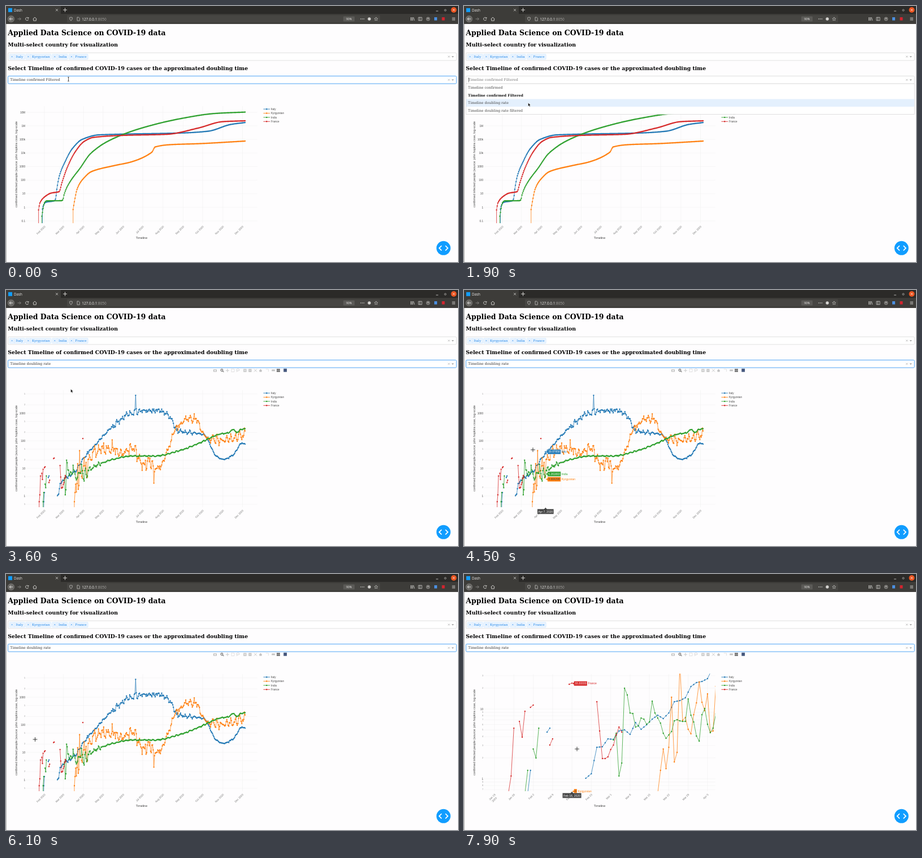
These frames come from a looping animation (800x455 px, 8000 ms). An HTML page:

```html
<!DOCTYPE html>
<html lang="en">
<head>
<meta charset="utf-8">
<title>Dash</title>
<style>
html, body { margin: 0; width: 100%; height: 100%; overflow: hidden; background: #fefdfe; }
svg { display: block; width: 800px; height: 455px; }
text { white-space: pre; }
.serif { font-family: "DejaVu Serif", serif; }
.plot { font-family: "Liberation Sans", Arial, sans-serif; }
.ui { font-family: "Open Sans", sans-serif; }
</style>
</head>
<body>
<svg id="stage" viewBox="0 0 800 455"></svg>
<script>
const LOOP = 8000;
const stage = document.getElementById('stage');

function el(tag, attrs, parent = stage, txt) {
  const e = document.createElementNS('http://www.w3.org/2000/svg', tag);
  for (const k in attrs) e.setAttribute(k, attrs[k]);
  if (txt !== undefined) e.textContent = txt;
  return parent.appendChild(e);
}
const group = (cls = '', parent = stage) => el('g', { class: cls }, parent);
const rect = (p, x, y, width, height, fill, more) => el('rect', { x, y, width, height, fill, ...more }, p);
const circle = (p, cx, cy, r, fill, more) => el('circle', { cx, cy, r, fill, ...more }, p);
const line = (p, d, stroke, w = 0.45, more) => el('path', { d, stroke, 'stroke-width': w, fill: 'none', ...more }, p);
const text = (p, x, y, s, size, fill = '#000', more) => el('text', { x, y, 'font-size': size, fill, ...more }, p, s);
const show = (e, on) => { e.style.display = on ? '' : 'none'; };
const cross = (p, x, y, r, color, w) => line(p, `M${x - r} ${y - r}L${x + r} ${y + r}M${x - r} ${y + r}L${x + r} ${y - r}`, color, w);
const plus = (p, x, y, r, color, w) => line(p, `M${x - r} ${y}H${x + r}M${x} ${y - r}V${y + r}`, color, w);

// ---- browser window ----
function drawBrowser() {
  const g = group('ui'), c = '#d6d5d2';
  rect(g, 0, 0, 800, 14.5, '#2b2a28');
  rect(g, 0, 0, 97, 14.5, '#3d3c39');
  rect(g, 0, 14, 800, 17.8, '#3d3c39');
  rect(g, 0, 31.4, 800, 0.5, '#242321');
  rect(g, 4, 3.8, 7, 7, '#119dff');
  text(g, 14, 9.6, 'Dash', 6.2, '#eeedeb');
  cross(g, 90, 7.2, 2, c, 0.8);
  plus(g, 104.5, 7, 3.5, c, 1);
  line(g, 'M761 9h4', c, 0.8);
  circle(g, 777.5, 7.5, 1.5, 'none', { stroke: c, 'stroke-width': 0.7 });
  circle(g, 792.5, 7, 5, '#e95420');
  cross(g, 792.5, 7, 1.7, '#fff', 0.8);

  circle(g, 9, 23, 5.9, '#6a6966', { stroke: '#8b8a87', 'stroke-width': 0.4 });
  line(g, 'M12 23H6.3m2.4-2.5L6.2 23l2.5 2.5', '#f4f3f1', 0.9);
  line(g, 'M20.5 23h5.7m-2.4-2.5l2.5 2.5-2.5 2.5', '#8b8a87', 0.9);
  line(g, 'M39.6 21.6a2.7 2.7 0 1 0 .2 2.4M39.9 20v2h-2', c, 0.9);
  line(g, 'M47.6 23.2L51 20l3.4 3.2M48.7 22.6v3.6h4.6v-3.6', c, 0.9);

  rect(g, 108, 16.3, 554, 13.2, '#474643', { rx: 1.2 });
  line(g, 'M112.6 20.7l2.4-.8 2.4.8q.2 3.9-2.4 5.5-2.6-1.6-2.4-5.5z', c, 0.7);
  line(g, 'M126 20h2.6l1.6 1.6v4.6H126z', c, 0.7);
  const url = text(g, 134.3, 25.5, '', 6.4, '#f4f3f1');
  el('tspan', {}, url, '127.0.0.1');
  el('tspan', { fill: '#a5a4a1' }, url, ':8050');
  rect(g, 597, 18.4, 20, 9, '#5b5a57', { rx: 1 });
  text(g, 607, 25, '90%', 5.2, '#eeedeb', { 'text-anchor': 'middle' });
  for (const x of [628, 630.7, 633.4]) circle(g, x, 23, 0.8, c);
  circle(g, 643, 23, 2.7, c);
  const star = Array.from({ length: 10 }, (_, i) => {
    const r = i % 2 ? 1.5 : 3.3, a = i * Math.PI / 5;
    return (655 + r * Math.sin(a)) + ' ' + (23.2 - r * Math.cos(a));
  });
  line(g, `M${star.join('L')}z`, c, 0.6);
  line(g, 'M716.5 20v6m1.8-6v6m1.7-6v6m1.3-5.8l1.7 5.8', c, 0.8);
  line(g, 'M730 20.2h6v5.6h-6zm2.6 0v5.6', c, 0.8);
  circle(g, 747, 23, 2.9, 'none', { stroke: c, 'stroke-width': 0.7 });
  circle(g, 747, 22.6, 1.2, c);
  rect(g, 758, 20, 5, 5.6, '#4b8fe0');
  rect(g, 771.5, 20, 5, 5.6, '#d3242e');
  line(g, 'M789.5 21h5.5m-5.5 2h5.5m-5.5 2h5.5', c, 0.8);
  rect(stage, 0, 31.8, 0.6, 424, '#8a8988');
}

// ---- page header and dropdowns ----
const options = ['Timeline confirmed', 'Timeline confirmed Filtered', 'Timeline doubling rate', 'Timeline doubling rate filtered'];
const countries = [
  { name: 'Italy', color: '#1f77b4', tagX: 6, tagW: 27.3 },
  { name: 'Kyrgyzstan', color: '#ff7f0e', tagX: 34.8, tagW: 45 },
  { name: 'India', color: '#2ca02c', tagX: 81.7, tagW: 27.5 },
  { name: 'France', color: '#d62728', tagX: 111.3, tagW: 33.8 }
];

function dropdown(p, y) {
  const box = rect(p, 3.5, y, 793.7, 13.6, '#fff', { rx: 1.7, stroke: '#ccc', 'stroke-width': 0.6 });
  cross(p, 783.8, y + 6.8, 1.5, '#999', 0.6);
  el('path', { d: `M788.6 ${y + 6.1}h4.2l-2.1 2.2z`, fill: '#999' }, p);
  return box;
}

function drawHeader() {
  const g = group('serif'), bold = { 'font-weight': 'bold' };
  text(g, 3.3, 51.8, 'Applied Data Science on COVID-19 data', 12.47, '#000', bold);
  text(g, 3.3, 72.4, 'Multi-select country for visualization', 9.35, '#000', bold);
  text(g, 3.3, 114, 'Select Timeline of confirmed COVID-19 cases or the approximated doubling time', 9.35, '#000', bold);
  dropdown(g, 83.2);
  for (const { name, tagX: x, tagW } of countries) {
    rect(g, x, 85.6, tagW, 9.3, '#ebf5ff', { rx: 0.9, stroke: '#c2e0ff', 'stroke-width': 0.45 });
    line(g, `M${x + 8.8} 85.6v9.3`, '#c2e0ff');
    cross(g, x + 4.6, 90.1, 1.4, '#3390ee', 0.55);
    text(g, x + 11.3, 92.3, name, 5.61, '#1a82e8');
  }
}

// ---- data: day 0 is Jan 19, 2020 ----
const X = d => 53 + 1.153 * d;
const LAST = 321;

// cumulative cases: x, y knots of each log curve
const totals = [
  [64.3, 362, 66, 355, 70, 349, 86, 346, 88, 342, 90, 325, 95, 300, 104, 278, 117, 254, 135, 237, 165, 229,
    315, 225.5, 358, 222.5, 398, 210.5, 424, 207],
  [118.5, 363, 121, 348, 126, 325, 135, 309, 152, 294, 190, 284, 222, 277, 258, 260, 264, 250.5, 290, 246.5,
    345, 244.5, 424, 240],
  [63.3, 374, 68, 350, 72, 346.3, 98, 346, 101, 344, 102, 338, 110, 318, 132, 287, 150, 262, 184, 238.5,
    240, 217, 310, 200, 370, 191, 424, 188.5],
  [57.5, 363, 60, 350, 68, 339.5, 80, 332.5, 94, 330, 99, 314, 108, 288, 122, 260, 138, 241, 155, 233.5,
    205, 230, 285, 228, 340, 217, 384, 205.5, 424, 204]
];

// doubling time up to April: runs of [first day, step, heights...] where 364 is 1 and 240 is 10
const early = [
  [[13, 1, 349], [19, 1, 281, 274],
    [33, 2, 363, 355, 308, 307, 293, 294, 279, 277, 285, 264, 276, 268, 258, 251, 257, 247, 227, 225, 220, 200, 193, 191, 186, 165]],
  [[60, 1, 349, 311, 346, 308, 219, 334, 317, 160, 260, 255, 276, 284, 250, 229, 192, 228, 243, 213, 281, 279]],
  [[12, 1, 349], [14, 1, 311, 327, 274],
    [43, 1, 295, 283, 359, 336, 203, 215, 247, 248, 272, 270, 256, 258, 267, 263, 226, 247, 256, 265, 283, 292, 286, 280,
      261, 259, 261, 262, 262, 222, 251, 263, 288, 297, 250, 239, 267, 282, 274]],
  [[6, 1, 359, 274], [9, 1, 262, 290, 244], [13, 1, 237, 233], [20, 1, 304, 293], [27, 1, 196, 194],
    [37, 1, 227, 279, 328, 328, 325, 312, 304, 286, 272, 281], [72, 1, 106]]
];

// doubling time from April on: x, y knots, with a weekly swing and noise added
const late = [
  [145, 290, 168, 264, 185, 246, 205, 229, 217, 219, 228.3, 218, 229.4, 188, 231, 216, 250, 214, 268, 214, 290, 225,
    304, 250, 350, 257, 372, 295, 384, 301, 402, 293, 418, 272, 424, 274],
  [145, 305, 160, 285, 190, 280, 205, 293, 226, 282, 240, 310, 260, 304, 261.7, 344, 263.3, 318, 270, 316, 286, 284,
    304, 242, 321, 229, 336, 228, 344, 248, 364, 267, 390, 266, 406, 261, 424, 254],
  [145, 321, 157, 313, 190, 301, 225, 295, 265, 295, 305, 286, 345, 271, 375, 257, 395, 253, 402, 247, 408, 253, 418, 247, 424, 247]
];
const swing = [
  x => x < 185 ? 2.2 : x < 330 ? 5.5 : 1.5,
  x => x < 258 ? 13 : x < 268 ? 1 : x < 345 ? 8 : x < 362 ? 3 : 10,
  x => x < 170 ? 4 : 1.2
];
const noise = (d, k) => { const v = Math.sin(d * 12.9898 + k * 78.233) * 43758.5453; return (v - Math.floor(v)) * 2 - 1; };

// smooth curve through the knots that never overshoots them
function curve(pts) {
  const n = pts.length / 2, x = i => pts[2 * i], y = i => pts[2 * i + 1];
  const rise = i => (y(i + 1) - y(i)) / (x(i + 1) - x(i));
  const slope = i => {
    if (i === 0) return rise(0);
    if (i === n - 1) return rise(n - 2);
    const a = rise(i - 1), b = rise(i);
    return a * b > 0 ? 2 * a * b / (a + b) : 0;
  };
  return at => {
    let i = 0;
    while (i < n - 2 && at > x(i + 1)) i++;
    const h = x(i + 1) - x(i), u = Math.max(0, Math.min(1, (at - x(i)) / h)), v = 1 - u;
    return v * v * ((1 + 2 * u) * y(i) + u * h * slope(i)) + u * u * ((1 + 2 * v) * y(i + 1) - v * h * slope(i + 1));
  };
}

// each country: runs of [day, log10 of doubling time]
const doubling = countries.map((_, k) => {
  const runs = early[k].map(([d0, step, ...ys], r) => {
    const run = [];
    for (let i = 0; i <= (ys.length - 1) * step; i++) {
      const j = Math.floor(i / step), f = i / step - j;
      run.push([d0 + i, (364 - (f ? ys[j] + f * (ys[j + 1] - ys[j]) : ys[j])) / 124]);
    }
    return r ? run : [[d0 - 2, -2.7], [d0 - 1, -0.21], ...run];
  });
  if (late[k]) {
    const base = curve(late[k]), last = runs[runs.length - 1];
    for (let d = 80; d <= LAST; d++) {
      const x = X(d), wave = 0.5 * Math.sin(d * Math.PI * 2 / 7) + 0.6 * noise(d, k);
      last.push([d, (366 - base(x) - swing[k](x) * wave) / 49]);
    }
  }
  return runs;
});

// ---- charts ----
const L = 34.5, R = 445, TOP = 178, BOTTOM = 386;
const clip = el('clipPath', { id: 'area' }, el('defs', {}));
rect(clip, L, TOP - 1, R - L, BOTTOM - TOP + 1, '#fff');

function plotRuns(p, runs, color) {
  let path = '', dots = '';
  for (const run of runs) run.forEach(([x, y], i) => {
    const at = `${x.toFixed(2)} ${y.toFixed(2)}`;
    path += (i ? 'L' : 'M') + at;
    dots += `M${at}h.01`;
  });
  line(p, path, color, 0.85, { opacity: 0.9, 'stroke-linejoin': 'round' });
  line(p, dots, color, 2.4, { 'stroke-linecap': 'round', opacity: 0.95 });
}

function chart(xTicks, yTicks, series) {
  const g = group('plot'), end = { 'text-anchor': 'end' };
  for (const [x, label, sub] of xTicks) {
    line(g, `M${x} ${TOP}V${BOTTOM}`, '#eee');
    const t = el('g', { transform: `translate(${x + 2} 392.5) rotate(-45)` }, g);
    text(t, 0, 0, label, 4.68, '#777', end);
    if (sub) text(t, -2.5, 6, sub, 4.68, '#777', end);
  }
  for (const [y, label, minor] of yTicks) {
    line(g, `M${L} ${y}H${R}`, '#eee');
    text(g, 34, y + (minor ? 1.1 : 1.7), label, minor ? 3 : 4.68, minor ? '#777' : '#444', end);
  }
  const area = el('g', { 'clip-path': 'url(#area)' }, g);
  series.forEach((runs, k) => plotRuns(area, runs, countries[k].color));
  return g;
}

const months = 'Jan Feb Mar Apr May Jun Jul Aug Sep Oct Nov Dec'.split(' ');
const START = Date.UTC(2020, 0, 19), DAY = 864e5;
const monthTicks = months.slice(1).map((m, i) => [X((Date.UTC(2020, i + 1, 1) - START) / DAY), m + ' 2020']);
const ZX = d => 54 + 4.896 * d;
const weekTicks = Array.from({ length: 12 }, (_, i) => {
  const day = new Date(START + i * 7 * DAY);
  return [ZX(i * 7), months[day.getUTCMonth()] + ' ' + day.getUTCDate(), i ? '' : '2020'];
});

function logTicks(one, decade, shown) {
  const ticks = [];
  for (let e = -1; e < 4; e++) for (let n = 1; n < 10; n++) {
    const y = one - decade * (e + Math.log10(n));
    if (shown(n) && y > TOP && y < BOTTOM) ticks.push([y, n === 1 ? 10 ** e : n, n > 1]);
  }
  return ticks;
}

drawBrowser();
drawHeader();

const totalChart = chart(monthTicks,
  '10M 1M 100k 10k 1000 100 10 1 0.1'.split(' ').map((s, i) => [188.8 + 24.15 * i, s]),
  totals.map(pts => {
    const run = [], y = curve(pts);
    for (let d = 0; d <= LAST; d++) if (X(d) >= pts[0]) run.push([X(d), y(X(d))]);
    return [[[run[0][0], 420], ...run]];
  }));
const place = (fx, fy) => doubling.map(runs => runs.map(run => run.map(([d, v]) => [fx(d), fy(v)])));
const rateChart = chart(monthTicks, logTicks(366, 49, n => 10 % n === 0), place(X, v => 366 - 49 * v));
const zoomChart = chart(weekTicks, logTicks(364, 124, () => true), place(ZX, v => 364 - 124 * v));

const labels = group('plot');
text(labels, 240, 413.5, 'Timeline', 5.45, '#444', { 'text-anchor': 'middle' });
text(labels, 0, 0, 'confirmed infected people (source: john hopkins csse, log-scale', 5.45, '#444',
  { 'text-anchor': 'middle', transform: 'translate(19.8 281.5) rotate(-90)' });
countries.forEach(({ name, color }, i) => {
  const y = 183.2 + 7.35 * i;
  line(labels, `M455.5 ${y}h11.7`, color, 0.85);
  circle(labels, 461.3, y, 1.2, color);
  text(labels, 469, y + 1.6, name, 4.68, '#444');
});

// ---- chart toolbar ----
const toolbar = group();
{
  const c = '#c4c4c4', on = '#6a6a6a';
  rect(toolbar, 367, 141, 6, 4.5, c, { rx: 0.6 });
  circle(toolbar, 370, 143.3, 1.2, '#fff');
  circle(toolbar, 382, 142.5, 1.9, 'none', { stroke: on, 'stroke-width': 1.1 });
  line(toolbar, 'M383.4 143.9l2 2', on, 1.1);
  plus(toolbar, 392, 143, 3, c, 0.9);
  line(toolbar, 'M399 140.5h5v5h-5z', c, 0.8, { 'stroke-dasharray': '1.1 .7' });
  el('ellipse', { cx: 410.5, cy: 142, rx: 2.7, ry: 1.7, fill: 'none', stroke: c, 'stroke-width': 0.7 }, toolbar);
  line(toolbar, 'M409 143.5l-.5 2.3', c, 0.7);
  for (const x of [420.3, 429.3]) rect(toolbar, x, 140.4, 5.3, 5.3, c);
  plus(toolbar, 423, 143, 1.7, '#fff', 0.7);
  line(toolbar, 'M430.3 143h3.3', '#fff', 0.7);
  cross(toolbar, 441.5, 143, 2.5, c, 0.9);
  el('path', { d: 'M447.7 143.3l2.9-2.7 2.9 2.7h-.8v2.3h-4.2v-2.3z', fill: c }, toolbar);
  line(toolbar, 'M460 140.8h4.5v4.5', c, 0.7, { 'stroke-dasharray': '1.5 .8' });
  rect(toolbar, 470.3, 141.3, 5.6, 3, c);
  for (const y of [140.2, 143.2]) rect(toolbar, 479, y, 6, 2.4, on);
  rect(toolbar, 491.3, 139.8, 5.8, 5.8, '#44567c');
}

// ---- hover labels ----
function hoverTag(p, x, y, w, country, value, ink = '#fff') {
  const { name, color } = countries[country];
  el('path', { d: `M${x} ${y}l3.5-1.8v-2.4h${w}v8.4h-${w}v-2.4z`, fill: color, stroke: '#fff', 'stroke-width': 0.4 }, p);
  text(p, x + 3.5 + w / 2, y + 1.7, value, 4.9, ink, { 'text-anchor': 'middle' });
  text(p, x + w + 5, y + 1.7, name, 4.9, color);
}
function dateTag(p, x, w, s) {
  const side = w / 2 - 2.4;
  el('path', { d: `M${x} 386.5l2.4 2.7h${side}v9h-${w}v-9h${side}z`, fill: '#444', stroke: '#fff', 'stroke-width': 0.4 }, p);
  text(p, x, 395.5, s, 5.06, '#fff', { 'text-anchor': 'middle' });
}
const hoverApril = group('plot');
hoverTag(hoverApril, 144.3, 287.6, 23.5, 0, '39.87958');
hoverTag(hoverApril, 144.3, 327, 23.5, 2, '5.261693');
hoverTag(hoverApril, 144.3, 336.4, 23.5, 1, '4.664296', '#444');
dateTag(hoverApril, 144.3, 29, 'Apr 7, 2020');
const hoverFeb = group('plot');
hoverTag(hoverFeb, 191, 194.6, 23.5, 3, '33.33333');
hoverTag(hoverFeb, 191, 386.3, 5.5, 1, '0', '#444');
dateTag(hoverFeb, 191, 33.5, 'Feb 16, 2020');

// ---- zoom selection ----
const selection = group();
const shade = el('path', { fill: '#000', 'fill-opacity': 0.4, 'fill-rule': 'evenodd' }, selection);
const corners = line(selection, '', '#444', 0.5);

// ---- second dropdown with its menu ----
const ROW = 13.55, MENU_TOP = 138.3;
const picker = group('serif');
const pickerBox = dropdown(picker, 124.5);
const pickerText = text(picker, 7.3, 133.1, '', 6.23);
const caret = rect(picker, 7.9, 127.3, 0.6, 8.2, '#222');
const menu = group('serif');
rect(menu, 3.5, 138.1, 793.7, 54.5, '#fff', { stroke: '#ccc', 'stroke-width': 0.6 });
const marked = rect(menu, 3.9, 0, 793, ROW, '#e4f0fd');
options.forEach((s, i) => text(menu, 7.1, 147.3 + ROW * i, s, 6.23, i === 1 ? '#111' : '#444',
  { 'font-weight': i === 1 ? 'bold' : 'normal' }));

// ---- floating button ----
circle(stage, 774.3, 430.3, 12.5, '#119dff');
line(stage, 'M771 426l-4.3 4.3 4.3 4.3m6.7-8.6l4.3 4.3-4.3 4.3', '#fff', 1.7);

// ---- mouse ----
const mouse = group();
const beam = group('', mouse), arrow = group('', mouse), aim = group('', mouse);
line(beam, 'M-1.3-3.5h2.6M0-3.5v7M-1.3 3.5h2.6', '#222', 0.8);
el('path', { d: 'M0 0v6.3l1.5-1.3 1 2.2 1.1-.5-1-2.1h2z', fill: '#111', stroke: '#fff', 'stroke-width': 0.5 }, arrow);
plus(aim, 0, 0, 4.3, '#fff', 1.9);
plus(aim, 0, 0, 3.9, '#222', 0.9);

const path = [
  [900, 110.5, 130], [1800, 113.5, 172], [2700, 113.5, 172], [3600, 114.5, 176], [4300, 144, 296], [4500, 122, 284],
  [5100, 56, 298], [5800, 65.3, 305], [6200, 49, 292], [6300, 49, 292], [6900, 144, 372], [7100, 145, 374.5],
  [7300, 145, 374.5], [7900, 200, 311]
];
function mouseAt(t) {
  let i = 0;
  while (i < path.length - 2 && t > path[i + 1][0]) i++;
  const [t0, x0, y0] = path[i], [t1, x1, y1] = path[i + 1];
  const u = Math.max(0, Math.min(1, (t - t0) / (t1 - t0))), f = u * u * (3 - 2 * u);
  return [x0 + f * (x1 - x0), y0 + f * (y1 - y0)];
}

const OPEN = 500, PICK = 2700, LOADED = 3300, DRAG = 6300, ZOOM = 7200;
function draw(t) {
  const [x, y] = mouseAt(t);
  const open = t >= OPEN && t < PICK, dragging = t >= DRAG && t < ZOOM;

  show(menu, open);
  show(caret, open && Math.floor(t / 600) % 2 === 1);
  pickerBox.setAttribute('stroke', open ? '#ccc' : '#3d9cf5');
  pickerBox.setAttribute('stroke-width', open ? 0.6 : 0.9);
  pickerText.textContent = options[t < PICK ? 1 : 2];
  pickerText.setAttribute('fill', open ? '#777' : '#333');
  const row = y < MENU_TOP ? 1 : Math.min(3, Math.floor((y - MENU_TOP) / ROW));
  marked.setAttribute('y', MENU_TOP + ROW * row);

  show(totalChart, t < LOADED);
  show(rateChart, t >= LOADED && t < ZOOM);
  show(zoomChart, t >= ZOOM);
  show(toolbar, t >= PICK && !dragging);
  show(hoverApril, t >= 4300 && t < 4700);
  show(hoverFeb, t >= 7700);

  show(selection, dragging);
  if (dragging) {
    shade.setAttribute('d', `M${L} 177.3H${R}V${BOTTOM}H${L}zM49 292H${x}V${y}H49z`);
    corners.setAttribute('d', `M48.5 295v-3.5h3.5M${x - 3} 291.5h3.5v3.5M48.5 ${y - 3}v3.5h3.5M${x - 3} ${y + 0.5}h3.5v-3.5`);
  }

  mouse.setAttribute('transform', `translate(${x} ${y})`);
  show(beam, y < 138);
  show(arrow, y >= 138 && y <= TOP);
  show(aim, y > TOP);
  aim.setAttribute('transform', dragging ? 'scale(.6)' : '');
}

function tick() {
  draw(performance.now() % LOOP);
  requestAnimationFrame(tick);
}
tick();
</script>
</body>
</html>
```
